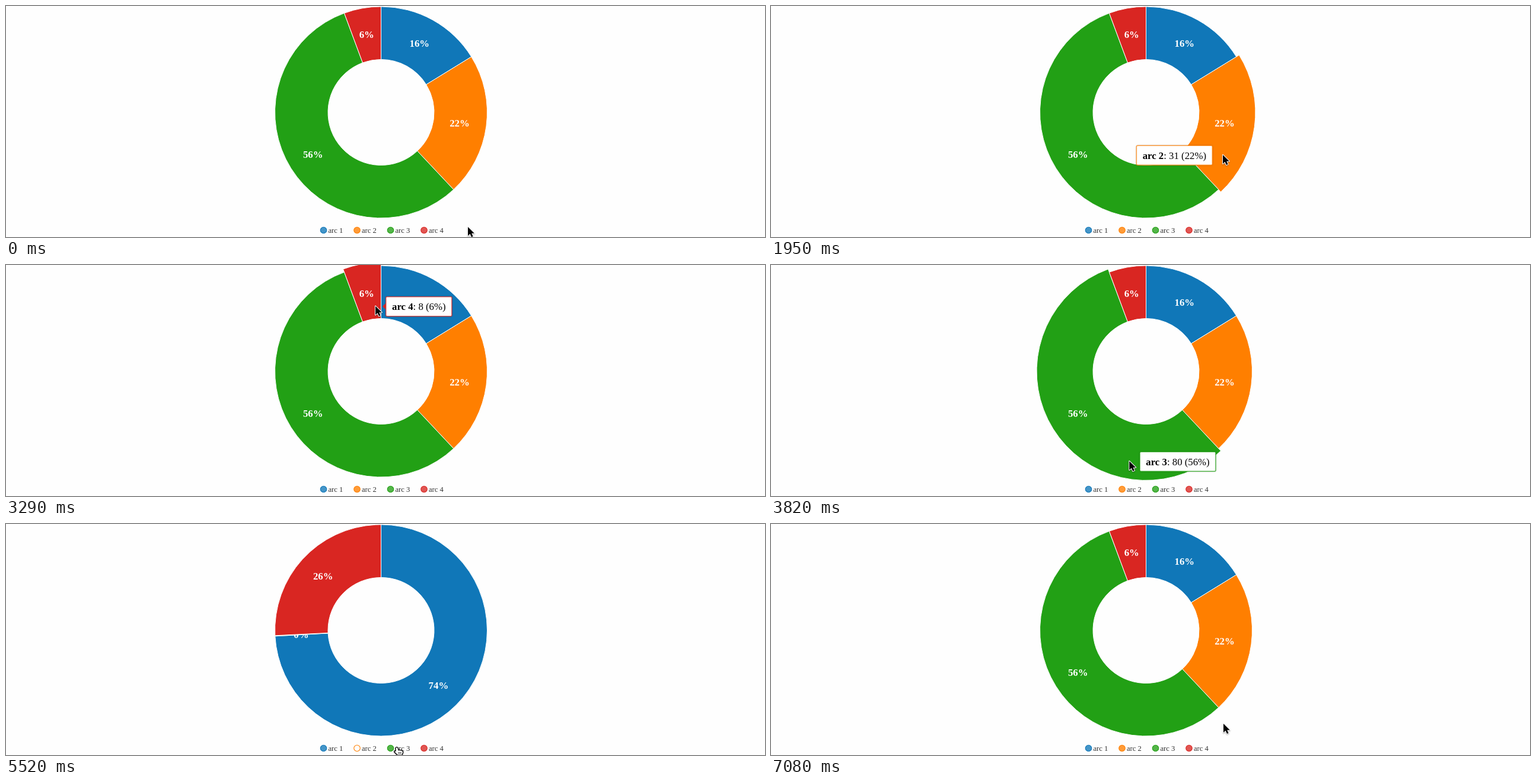
An HTML page with a canvas for the animation above (7800 ms loop, 1280x391 px).

```html
<!DOCTYPE html>
<html lang="en">
<head>
<meta charset="utf-8">
<title>Donut chart</title>
<style>
  html, body { margin: 0; width: 100%; height: 100%; overflow: hidden; background: #fefefe; }
  canvas { display: block; }
</style>
</head>
<body>
<canvas id="stage" width="1280" height="391"></canvas>
<script>
const ctx = document.getElementById('stage').getContext('2d');
const LOOP = 7800, TOGGLE_MS = 250, GROW_MS = 140;
const CX = 632.5, CY = 180, OUTER = 179, INNER = 89.5, GROWTH = 5.5;
const BACKGROUND = '#fefefe';
const SERIF = '"Liberation Serif", "Times New Roman", serif';

const DATA = [23, 31, 80, 8];
const TOTAL = 142;
const COLORS = ['#1077b8', '#ff7f00', '#22a015', '#d92622'];

// Which arcs are enabled from which time on
const TOGGLES = [
  [0, [1, 1, 1, 1]],
  [4388, [1, 0, 1, 1]],
  [4930, [1, 0, 0, 1]],
  [5510, [1, 0, 1, 1]],
  [5690, [0, 0, 1, 0]],
  [6420, [1, 1, 1, 1]]
];

// arc, start, end, whether a tooltip shows
const HOVERS = [
  [3, 741, 1337, true],
  [2, 1450, 1805, true],
  [1, 1805, 2738, true],
  [0, 2738, 3093, true],
  [3, 3093, 3332, true],
  [2, 3670, 3905, true],
  [1, 4020, 4520, false],
  [2, 4540, 5190, false]
];

// time, x, y of the pointer
const POINTER = [
  [0, 779, 374], [60, 779, 374], [180, 771, 376], [350, 771, 376],
  [780, 627, 62], [1310, 627, 62], [1480, 650, 310], [1690, 650, 310],
  [1880, 762, 252], [2450, 762, 252], [2650, 750, 150], [2850, 700, 85],
  [3050, 636, 62], [3210, 623, 69], [3290, 623, 69], [3500, 625, 180],
  [3750, 610, 310], [3950, 594, 372], [4060, 592, 378], [4390, 592, 378],
  [4500, 637, 378], [4650, 659, 378], [6700, 659, 378], [7080, 763, 338],
  [LOOP, 763, 338]
];
const HAND_FROM = 3980, HAND_TO = 6760;
const SELECT_FROM = 5690, SELECT_TO = 6420;

const ARROW = new Path2D('M0 0V15L3.5 11.8L6 17L8.6 15.9L6.3 10.8H10.8Z');
const HAND = new Path2D('M-2 1Q0-1.5 2 1L3 5Q5 4 6 5Q8 4 9 6Q11 6 10.5 9L9 13H1L-4 8Q-5 5-2 6.5Z');
const KNUCKLES = new Path2D('M3 8V11M5 8V11M7 8V11');

const mix = (a, b, p) => a + (b - a) * p;
const clamp = p => Math.max(0, Math.min(1, p));
const ease = p => {
  p = clamp(p);
  return p < .5 ? 4 * p ** 3 : 1 - 4 * (1 - p) ** 3;
};
const percent = (value, total) => Math.round(100 * value / total) + '%';

function enabledAt(t) {
  return TOGGLES.filter(([start]) => start <= t).pop()[1];
}

function valuesAt(t) {
  let values = DATA;
  TOGGLES.forEach(([start, enabled], k) => {
    if (k === 0 || t < start) return;
    const end = k + 1 < TOGGLES.length ? TOGGLES[k + 1][0] : LOOP;
    const p = ease((Math.min(t, end) - start) / TOGGLE_MS);
    values = values.map((v, i) => mix(v, DATA[i] * enabled[i], p));
  });
  return values;
}

function growthAt(arc, t) {
  return Math.max(0, ...HOVERS.filter(h => h[0] === arc).map(([, start, end]) =>
    ease((t - start) / GROW_MS) - ease((t - end) / GROW_MS)));
}

function pointerAt(t) {
  const k = POINTER.findIndex(([time]) => time > t);
  const [t0, x0, y0] = POINTER[k - 1], [t1, x1, y1] = POINTER[k];
  const p = (t - t0) / (t1 - t0);
  return [mix(x0, x1, p), mix(y0, y1, p)];
}

function text(string, x, y, size, color, weight = '', align = 'left') {
  ctx.font = `${weight} ${size}px ${SERIF}`;
  ctx.textAlign = align;
  ctx.fillStyle = color;
  ctx.fillText(string, x, y);
  return ctx.measureText(string).width;
}

function drawSlice(from, to, radius, color) {
  const a = from - Math.PI / 2, b = to - Math.PI / 2;
  ctx.beginPath();
  ctx.arc(CX, CY, radius, a, b);
  if (to - from > 2 * Math.PI - 1e-4) ctx.moveTo(CX + INNER * Math.cos(b), CY + INNER * Math.sin(b));
  ctx.arc(CX, CY, INNER, b, a, true);
  ctx.closePath();
  ctx.fillStyle = color;
  ctx.fill();
  ctx.strokeStyle = '#fff';
  ctx.lineWidth = 1;
  ctx.stroke();
}

function drawChart(t) {
  const values = valuesAt(t), enabled = enabledAt(t);
  const total = values.reduce((a, b) => a + b);
  const labelRadius = (OUTER + INNER) / 2;
  let from = 0;
  values.forEach((value, i) => {
    if (value < .001) return;
    const to = from + value / total * 2 * Math.PI, middle = (from + to) / 2;
    drawSlice(from, to, OUTER + GROWTH * growthAt(i, t), COLORS[i]);
    // A leaving arc keeps its full value in the label
    text(percent(enabled[i] ? value : DATA[i], total),
      CX - .6 + labelRadius * Math.sin(middle), CY + 6.4 - labelRadius * Math.cos(middle),
      16.8, '#fff', 'bold', 'center');
    from = to;
  });
}

function drawLegend(t) {
  const enabled = enabledAt(t);
  if (t >= SELECT_FROM && t < SELECT_TO) {
    ctx.fillStyle = '#accef7';
    ctx.fillRect(657, 372, 15, 15);
  }
  COLORS.forEach((color, i) => {
    const x = 535.5 + 56.5 * i;
    ctx.beginPath();
    ctx.arc(x, 379.5, 5.25, 0, 2 * Math.PI);
    ctx.fillStyle = ctx.strokeStyle = color;
    ctx.lineWidth = 1.1;
    ctx.globalAlpha = enabled[i] ? .78 : 0;
    ctx.fill();
    ctx.globalAlpha = 1;
    ctx.stroke();
    text(`arc ${i + 1}`, x + 8, 383.5, 12.6, '#333');
  });
}

function drawTooltip(t, x, y) {
  const hover = HOVERS.find(([, start, end, tip]) => tip && t >= start && t < end);
  if (!hover) return;
  const arc = hover[0], name = `arc ${arc + 1}`;
  const rest = `: ${DATA[arc]} (${percent(DATA[arc], TOTAL)})`;
  ctx.font = `bold 16.8px ${SERIF}`;
  const nameWidth = ctx.measureText(name).width;
  ctx.font = `16.8px ${SERIF}`;
  const width = nameWidth + ctx.measureText(rest).width + 22;
  const toRight = x < CX, side = toRight ? 1 : -1;
  const edge = x + 17 * side, left = toRight ? edge : edge - width, top = y - 16.5;

  ctx.fillStyle = COLORS[arc];
  ctx.beginPath();
  ctx.moveTo(edge - 5 * side, y + .5);
  ctx.lineTo(edge, y - 4.5);
  ctx.lineTo(edge, y + 5.5);
  ctx.fill();

  ctx.save();
  ctx.shadowColor = 'rgba(0,0,0,.3)';
  ctx.shadowBlur = 3;
  ctx.beginPath();
  ctx.roundRect(left + .7, top + .7, width - 1.4, 33, 2);
  ctx.fillStyle = '#fff';
  ctx.fill();
  ctx.restore();
  ctx.globalAlpha = .75;
  ctx.strokeStyle = COLORS[arc];
  ctx.lineWidth = 1.5;
  ctx.stroke();
  ctx.globalAlpha = 1;

  text(name, left + 11, y + 6.5, 16.8, '#000', 'bold');
  text(rest, left + 11 + nameWidth, y + 6.5, 16.8, '#000');
}

function drawPointer(t, x, y) {
  const hand = t >= HAND_FROM && t < HAND_TO;
  const shape = hand ? HAND : ARROW;
  ctx.save();
  ctx.translate(x, y);
  ctx.lineJoin = 'round';
  ctx.strokeStyle = hand ? '#000' : '#fff';
  ctx.fillStyle = hand ? '#fff' : '#000';
  ctx.lineWidth = hand ? 1.2 : 2;
  ctx.shadowColor = 'rgba(0,0,0,.35)';
  ctx.shadowBlur = 2;
  ctx.shadowOffsetY = 1;
  ctx.stroke(shape);
  ctx.shadowColor = 'transparent';
  ctx.fill(shape);
  if (hand) {
    ctx.stroke(shape);
    ctx.lineWidth = .8;
    ctx.stroke(KNUCKLES);
  }
  ctx.restore();
}

function draw(t) {
  const [x, y] = pointerAt(t);
  ctx.fillStyle = BACKGROUND;
  ctx.fillRect(0, 0, 1280, 391);
  drawChart(t);
  drawLegend(t);
  drawTooltip(t, x, y);
  drawPointer(t, x, y);
}

const began = performance.now();
function tick() {
  draw((performance.now() - began) % LOOP);
  requestAnimationFrame(tick);
}
tick();
</script>
</body>
</html>
```
